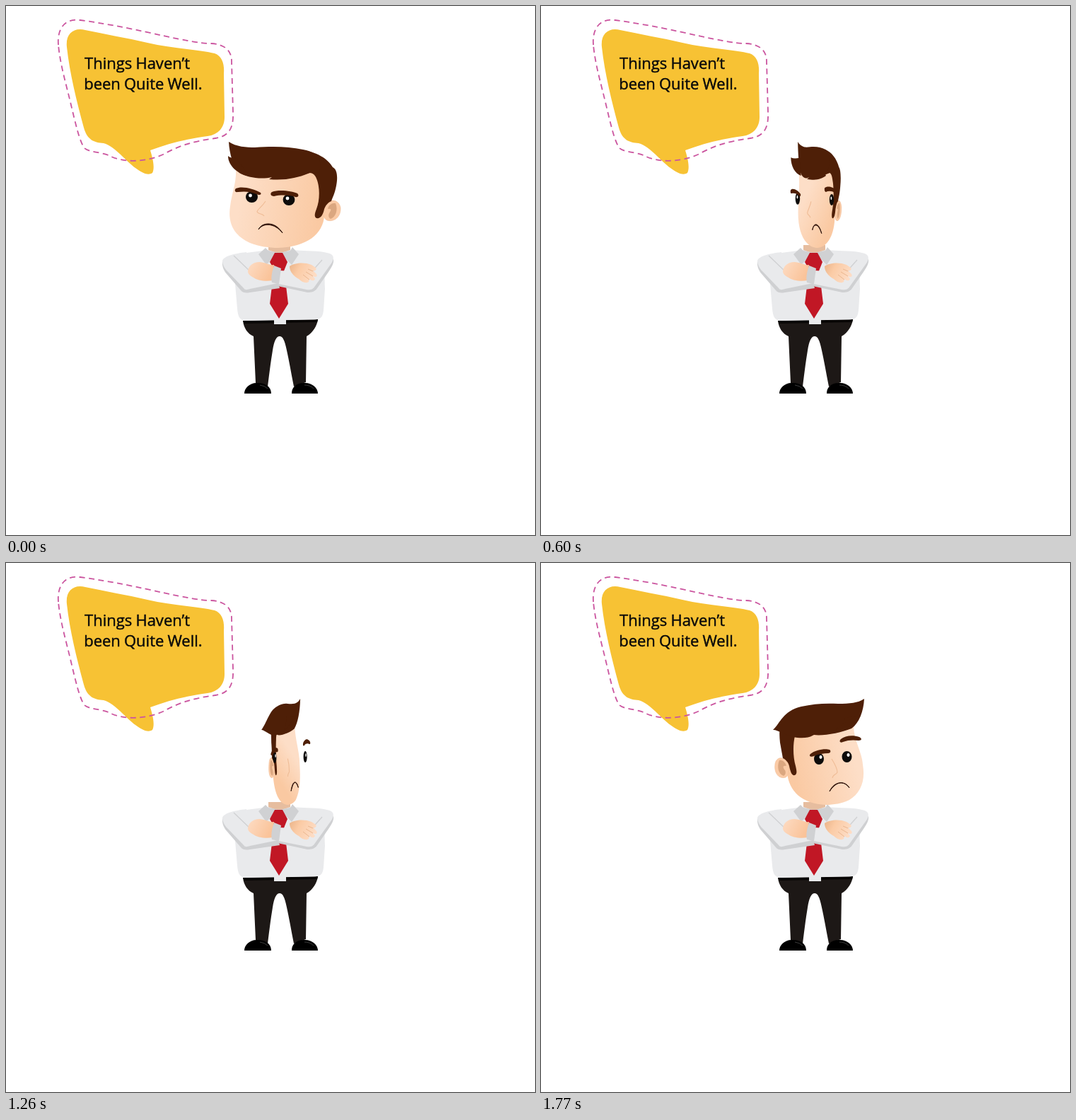
An HTML page for the animation above (3.63 s loop, 748 px wide and 748 px high).

```html
<!DOCTYPE html>
<html lang="en">
<head>
<meta charset="utf-8">
<title>Things Haven’t been Quite Well</title>
<style>
  html, body { margin: 0; width: 100%; height: 100%; overflow: hidden; background: #fff; }
  svg { display: block; width: 100%; height: 100%; }
  text { font: 22px "Open Sans", "Noto Sans", sans-serif; word-spacing: -.6px; fill: #0a0a0a; stroke: #0a0a0a; stroke-width: .45; }
</style>
</head>
<body>
<svg viewBox="0 0 748 748">
  <defs>
    <linearGradient id="skin" gradientUnits="userSpaceOnUse" y1="280" y2="300">
      <stop offset="0" stop-color="#fddec7"/><stop offset="1" stop-color="#fac9a2"/>
    </linearGradient>
    <linearGradient id="hand" x1="0" y1="0" x2="1" y2=".4">
      <stop offset="0" stop-color="#fddcc4"/><stop offset="1" stop-color="#fac399"/>
    </linearGradient>
    <linearGradient id="hand2" x1="1" y1=".4" x2="0" y2="0">
      <stop offset="0" stop-color="#fddcc4"/><stop offset=".6" stop-color="#fbcba5"/><stop offset="1" stop-color="#e9b388"/>
    </linearGradient>
  </defs>

  <g id="bubble">
    <path fill="#f7c234" d="M86 58C84 40 95 30 112 34C140 40 170 45 200 52C235 60 275 62 295 67C306 71 309 83 308 95L309 157C309 172 300 182 285 184C262 187 232 193 204 204C207 214 211 228 207 236C200 241 190 234 183 229C170 220 155 199 138 194C125 193 115 190 110 172C100 135 90 95 86 58Z"/>
    <path fill="none" stroke="#cb559f" stroke-width="1.8" stroke-dasharray="8 5.5" d="M74 55C72 30 85 17 105 20C150 26 190 35 222 42C250 48 275 53 290 53C308 54 319 62 319 78L321 150C322 172 316 184 296 187C265 191 243 198 222 210C200 220 166 223 145 211C132 206 118 207 111 201C104 192 98 165 92 140C85 110 77 85 74 55Z"/>
    <text x="111" y="89">Things Haven’t</text>
    <text x="110.2" y="118">been Quite Well.</text>
  </g>

  <g id="legs">
    <path fill="#1d1816" d="M335 445L441 443C440 452 434 462 425 467L424 532L407 538C403 518 400 500 397 487C394 472 391 467 387 467C382 467 379 474 377 487C374 505 372 522 370 538L353 533L350 467C342 464 336 455 335 445Z"/>
    <path fill="#070504" d="M335 445L441 443L440 447L337 449Z"/>
    <path d="M337 548C337 540 345 533 354 533C365 532 375 537 375 548Z"/>
    <path d="M404 548C404 537 413 532 423 533C433 533 441 540 441 548Z"/>
    <path fill="none" stroke="#4b4b4b" stroke-width=".8" d="M359 536Q366 537 370 541M422 536Q430 536 435 541"/>
  </g>

  <path fill="#e6bd9f" d="M371 338H402V347L386 352L371 347Z"/>
  <g id="torso">
    <path fill="#e9eaec" d="M340 349L371 345L386 350L402 345L440 347C452 351 450 372 451 400L449 430C448 441 444 443 436 443.5L340 445C331 445 328 440 327 428L324 393L326 355Z"/>
    <path fill="#e9eaec" d="M379 442H396V450H379Z"/>
    <path fill="#d0d1d3" d="M367 342L357 351L368 366L386 348L404 366L414 351L405 341L402 346L386 349L371 346Z"/>
    <path fill="#c11725" d="M380 349H391L398 362L392 377L378 371L373 362ZM376 396H396L399 421L386 442L373 421Z"/>
  </g>
  <g id="arms">
    <path fill="#cfd0d2" d="M306 361C305 369 309 376 313 380L332 402C335 406 340 406 345 405L387 399L384 389L340 392Z"/>
    <path fill="#e9eaec" d="M340 348C322 350 308 354 306 360C306 366 309 371 313 375L337 400C338 402 342 401 345 400L384 392L378 384L350 387L342 374Z"/>
    <path fill="#cfd0d2" d="M463 358C464 364 460 370 456 376L440 399C437 404 432 405 426 405L384 396L390 384Z"/>
    <path fill="#e9eaec" d="M425 347C440 346 457 348 461 352C464 355 463 360 460 364L437 396C434 401 430 402 425 401L385 393L387 374L402 375L420 386L436 374Z"/>
    <path fill="none" stroke="#d0d1d3" stroke-width="1.3" d="M322 353L346 376M447 359L431 377"/>
    <path fill="url(#hand)" d="M342 375C343 366 351 362 358 362C366 362 372 367 379 366L377 388C367 390 355 388 350 384C345 381 342 379 342 375Z"/>
    <path fill="#d0d1d3" d="M379 367L389 371L386 393L376 391C374 383 377 373 379 367Z"/>
    <path fill="url(#hand2)" d="M401 368C408 363 422 362 432 366L438 370C440 373 437 375 434 374L439 379C441 383 438 384 434 382L437 386C435 390 431 388 429 386L428 390C424 393 418 390 414 386C407 382 401 376 401 368Z"/>
    <path fill="none" stroke="#e5ae84" stroke-width=".8" d="M427 372L434 375M424 376L434 382M420 380L429 387"/>
  </g>

  <g id="head"></g>
</svg>
<script>
const STEP = 30, STEPS = 59, LOOP = 3630;
const HAIR = '#4e1f07';
const head = document.getElementById('head');
const skin = document.getElementById('skin');

const oval = (x, y, rx, ry) =>
  `M${x - rx} ${y}a${rx} ${ry} 0 1 0 ${2 * rx} 0a${rx} ${ry} 0 1 0 ${-2 * rx} 0Z`;

// Each part: paint, pose facing left, pose facing right.
const parts = [
  [{ fill: 'url(#skin)' },
    'M325 232C326 250 319 265 317 283C313 308 323 325 345 335C358 340 372 342 385 342C425 341 449 322 450 296C452 270 450 240 430 225C400 215 340 215 325 232Z',
    'M442 232C443 252 454 268 455 285C459 308 452 325 436 335C426 340 413 342 403 342C369 341 350 322 348 296C345 270 348 240 360 225C385 215 430 215 442 232Z'],
  [{ fill: '#fbcba6', stroke: '#efbd97', 'stroke-width': .6 },
    'M450 284C456 272 470 272 473 285C474 298 464 306 454 303C449 301 447 292 450 284Z',
    'M350 284C346 274 333 272 331 284C329 298 337 306 346 303C350 301 352 292 350 284Z'],
  [{ fill: '#dba780' },
    'M466 279C460 278 456 282 455 287C462 286 459 290 457 293C455 297 457 300 459 301C466 299 470 288 466 279Z',
    'M337 279C342 278 346 283 347 287C341 286 342 290 345 293C347 297 345 300 343 301C336 299 333 288 337 279Z'],
  // hair: back with sideburn, front, tuft
  [{ fill: HAIR },
    'M415 203C440 206 455 216 462 228C469 231 469 244 467 254C465 265 462 270 460 276C455 278 452 282 450 287C448 297 444 301 439 300C435 298 437 292 439 287C443 277 444 262 441 250C439 242 436 236 429 236L405 240Z',
    'M375 203C354 206 346 216 342 228C336 232 337 244 338 254C340 265 341 270 342 276C346 278 350 282 351 287C353 297 355 301 359 300C363 298 361 292 360 287C357 277 356 262 358 250C359 242 362 240 368 236L385 240Z'],
  [{ fill: HAIR },
    'M315 192C325 199 340 200 352 200C380 198 400 199 420 203C447 208 446 222 443 236C437 235 431 235 427 237C412 243 395 247 372 245L376 242C360 246 340 242 330 236C321 226 316 210 315 192Z',
    'M457 192C448 198 437 199 420 199C402 198 385 199 368 203C342 209 338 227 328 236C333 235 345 243 356 246C366 248 378 248 384 244L386 243C398 245 425 240 439 234C450 226 456 210 457 192Z'],
  [{ fill: HAIR },
    'M314 212C317 215 321 215 324 214L345 241C328 238 314 226 314 212Z',
    'M430 219C435 218 440 217 446 216L412 238C420 236 430 228 430 219Z'],
  // nose and mouth
  [{ fill: 'none', stroke: '#efbc96', 'stroke-width': 1.1 },
    'M367 276C362 284 355 288 355 291C357 295 363 293 365 297',
    'M411 277C416 285 419 293 419 296C417 300 413 298 412 304'],
  [{ fill: '#2c1008', stroke: '#2c1008', 'stroke-width': 1 },
    'M357 316C362 305 381 304 391 321C380 307 364 306 357 316Z',
    'M436 318C431 308 415 307 408 323C417 309 428 307 436 318Z'],
  // eyes
  [{ fill: '#0d0b0a' }, oval(347.5, 270, 8.5, 8), oval(393, 277, -7, 8)],
  [{ fill: '#fff' }, oval(345.5, 268, 2.4, 2.4), oval(395.5, 274.5, -2, 2.4)],
  [{ fill: '#0d0b0a' }, oval(400, 274, 8.4, 8), oval(432.5, 274, -7, 8)],
  [{ fill: '#fff' }, oval(398, 272, 2.4, 2.4), oval(434.5, 271.5, -2, 2.4)],
  // brows
  [{ fill: HAIR },
    'M325 258C333 254 350 258 360 264C362 267 358 268 354 266C345 262 336 262 328 263C323 264 323 260 325 258Z',
    'M408 264C402 262 388 264 381 270C378 273 382 275 386 273C393 270 400 269 406 269C410 269 410 265 408 264Z'],
  [{ fill: HAIR },
    'M376 263C386 259 405 262 412 265C415 268 413 271 409 270C400 267 388 267 379 269C374 269 373 265 376 263Z',
    'M450 246C441 243 430 244 424 249C421 252 423 255 427 253C434 250 443 250 449 251C454 251 454 248 450 246Z']
].map(([paint, from, to]) => {
  const el = document.createElementNS('http://www.w3.org/2000/svg', 'path');
  for (const name in paint) el.setAttribute(name, paint[name]);
  head.append(el);
  return { el, from, to: to.match(/-?[\d.]+/g).map(Number) };
});

const lerp = (a, b, k) => a + (b - a) * k;

function mix(from, to, k) {
  let i = 0;
  return from.replace(/-?[\d.]+/g, n => +lerp(+n, to[i++], k).toFixed(2));
}

function draw(time) {
  const k = Math.min(Math.floor((time % LOOP) / STEP), STEPS) / STEPS;
  for (const { el, from, to } of parts) el.setAttribute('d', mix(from, to, k));
  skin.setAttribute('x1', lerp(330, 445, k));
  skin.setAttribute('x2', lerp(445, 355, k));
}

let start;
function tick(now) {
  start ??= now;
  draw(now - start);
  requestAnimationFrame(tick);
}
draw(0);
requestAnimationFrame(tick);
</script>
</body>
</html>
```
